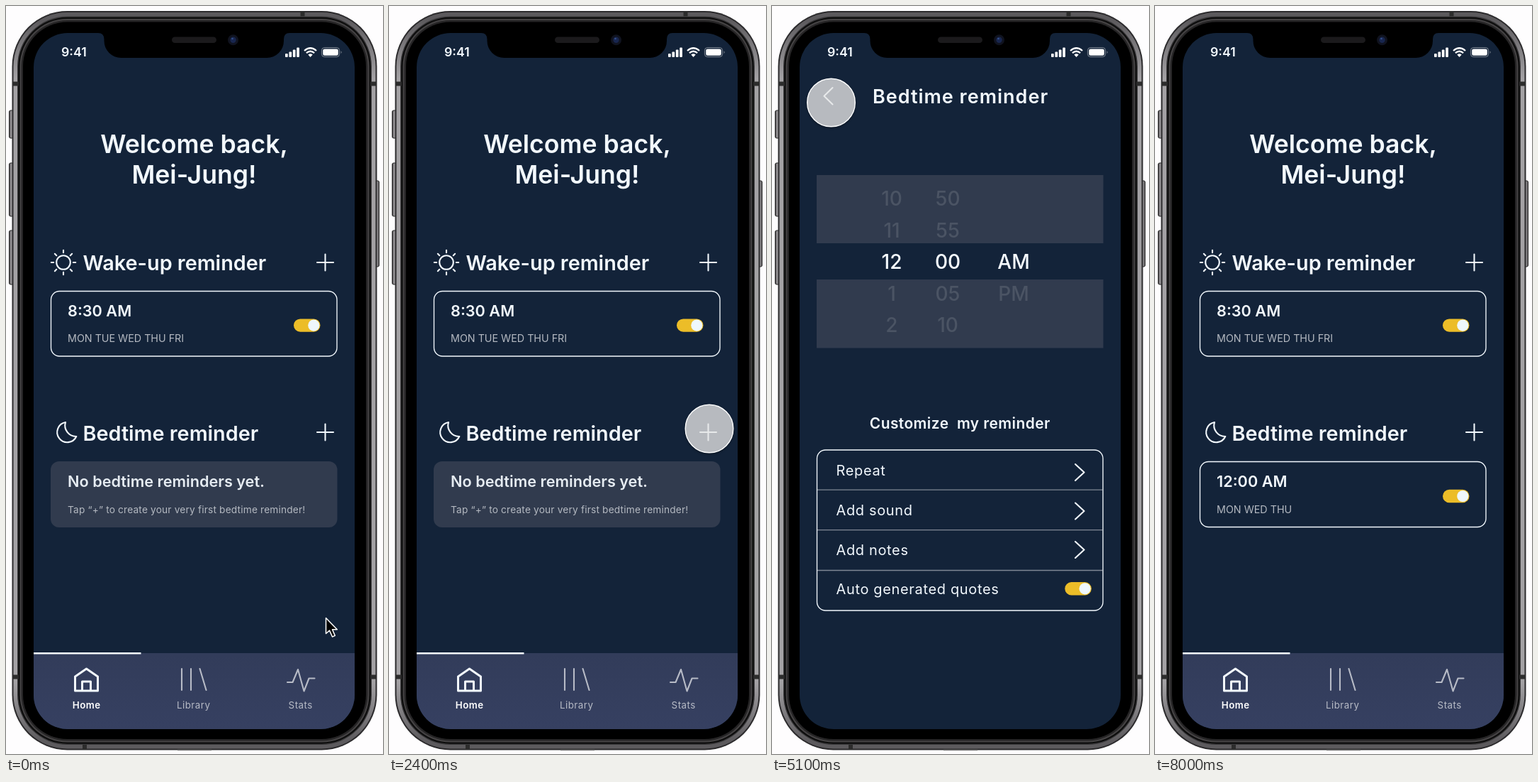
These frames come from a looping animation (532x1053 px, 8.1 s). An HTML page:

```html
<!DOCTYPE html>
<html lang="en">
<head>
<meta charset="utf-8">
<title>Bedtime reminder</title>
<style>
  html, body { margin: 0; width: 100%; height: 100%; overflow: hidden; background: #fefdfe; }
  svg { display: block; width: 532px; height: 1053px; }
  text { font-family: Inter, "Open Sans", sans-serif; fill: #f2f8fd; }
  .line { fill: none; stroke: #f2f8fd; stroke-width: 2.1; stroke-linecap: round; stroke-linejoin: round; }
  .thin { stroke-width: 1.35; }
  .bold { stroke-width: 3; }
  .off { stroke: #b7bbc6; }
  .mid { text-anchor: middle; }
  .welcome { font-size: 35.6px; font-weight: 600; }
  .head { font-size: 28.8px; font-weight: 600; }
  .title { font-size: 27px; font-weight: 600; letter-spacing: 1px; }
  .time { font-size: 21.7px; font-weight: 600; }
  .note { font-size: 14.3px; fill: #b4b9c1; }
  .tip { font-size: 13.7px; letter-spacing: .18px; fill: #b4b9c1; }
  .tab { font-size: 13.3px; letter-spacing: .5px; fill: #b7bbc6; }
  .tab.on { font-weight: 600; fill: #fff; }
  .sub { font-size: 20.9px; font-weight: 600; letter-spacing: .45px; }
  .row { font-size: 20px; letter-spacing: .65px; }
  .pick { font-size: 28px; font-weight: 500; text-anchor: middle; fill: #4b5464; }
  .pick.on { fill: #f6fbff; }
</style>
</head>
<body>
<svg viewBox="0 0 532 1053">
  <defs>
    <linearGradient id="nav" x1="0" y1="0" x2="0" y2="1">
      <stop offset="0" stop-color="#323c5a"/><stop offset="1" stop-color="#364061"/>
    </linearGradient>
    <linearGradient id="key">
      <stop offset="0" stop-color="#4a484a"/><stop offset=".5" stop-color="#a9a6a9"/><stop offset="1" stop-color="#5a585a"/>
    </linearGradient>
    <linearGradient id="rim" x1="0" y1="0" x2="0" y2="1">
      <stop offset=".01" stop-color="#5c5a5d"/><stop offset=".09" stop-color="#a3a1a4"/>
      <stop offset=".91" stop-color="#a3a1a4"/><stop offset=".99" stop-color="#5c5a5d"/>
    </linearGradient>
    <clipPath id="clip"><rect x="39" y="38" width="453" height="980" rx="48"/></clipPath>
    <filter id="soft" x="-20%" y="-20%" width="140%" height="140%" color-interpolation-filters="sRGB">
      <feDropShadow dx="0" dy="1.5" stdDeviation="1.5" flood-color="#000" flood-opacity=".4"/>
    </filter>
    <g id="plus"><path class="line" d="M-11.5 0H11.5M0 -11.5V11.5"/></g>
    <g id="more"><path class="line" d="M-6 -11.5L6.5 0L-6 11.5"/></g>
    <g id="toggle">
      <rect x="-18.5" y="-9.2" width="37.5" height="18.4" rx="9.2" fill="#ecbd28"/>
      <circle cx="9.8" r="8.1" fill="#eff7fc"/>
    </g>
  </defs>

  <!-- phone body -->
  <g fill="url(#key)" stroke="#222" stroke-width="1">
    <rect x="4.5" y="147" width="7" height="39" rx="2"/>
    <rect x="4.5" y="221" width="7" height="75" rx="2"/>
    <rect x="4.5" y="316" width="7" height="76" rx="2"/>
    <rect x="519" y="246" width="7.5" height="121" rx="2"/>
  </g>
  <g id="body"></g>
  <path d="M9 109.5h9M9 944.5h9M514 109.5h9M514 944.5h9M418.5 7.5v7M111 1040v7" stroke="#2c2c2c" stroke-width="6"/>
  <path d="M242 1047.5h48" stroke="#777" stroke-width="1.5"/>

  <g clip-path="url(#clip)">
    <rect x="39" y="38" width="453" height="980" fill="#132339"/>

    <g id="home">
      <text class="welcome mid" x="265.5" y="206.5">Welcome back,</text>
      <text class="welcome mid" x="265.5" y="249.5">Mei-Jung!</text>

      <g id="sun" transform="translate(81 361)"><circle class="line" r="9.8"/></g>
      <text class="head" x="108.5" y="371.5">Wake-up reminder</text>
      <use href="#plus" x="450.5" y="361"/>
      <rect class="line thin" x="63.5" y="401.5" width="403.5" height="91.5" rx="12"/>
      <text class="time" x="87" y="437">8:30 AM</text>
      <text class="note" x="87" y="473">MON TUE WED THU FRI</text>
      <use href="#toggle" x="424.5" y="449.6"/>

      <path class="line" d="M84 586A14.2 14.2 0 1 0 99.3 606A15.5 15.5 0 0 1 84 586Z"/>
      <text class="head" x="108.5" y="611.5">Bedtime reminder</text>
      <use href="#plus" x="450.5" y="600"/>
      <g id="empty">
        <rect x="63" y="641" width="404.5" height="93" rx="12" fill="#313b4e"/>
        <text class="time" x="87" y="677" opacity=".94">No bedtime reminders yet.</text>
        <text class="tip" x="87" y="713.5">Tap “+” to create your very first bedtime reminder!</text>
      </g>
      <g id="saved">
        <rect class="line thin" x="63.5" y="641.5" width="403.5" height="92" rx="12"/>
        <text class="time" x="87" y="677">12:00 AM</text>
        <text class="note" x="87" y="713.5">MON WED THU</text>
        <use href="#toggle" x="424.5" y="690"/>
      </g>

      <rect x="39" y="911" width="453" height="107" fill="url(#nav)"/>
      <path d="M39 911.3H190.5" stroke="#f2f8fd" stroke-width="2.6"/>
      <path class="line bold" d="M97.5 944L113.5 933L129.5 944V964H97.5ZM107.5 964V951H119.5V964"/>
      <path class="line off" d="M248 933V963M261 933V963M273.5 933L282.5 963"/>
      <path class="line off" d="M397 952H404.5L412 934L420.5 964.5L427.5 946.5H435.5"/>
      <text class="tab on mid" x="113.7" y="988.5">Home</text>
      <text class="tab mid" x="264.7" y="988.5">Library</text>
      <text class="tab mid" x="415.7" y="988.5">Stats</text>
    </g>

    <g id="edit">
      <path class="line" d="M85.5 115L73.5 126.8L85.5 138.5"/>
      <text class="title mid" x="266" y="137">Bedtime reminder</text>
      <path d="M63 238H467.5V334H63ZM63 385H467.5V481.5H63Z" fill="#313b4e"/>
      <g id="picker"></g>
      <text class="sub mid" x="265.3" y="595">Customize&#160; my reminder</text>
      <path d="M64 681.2H466.5M64 737.7H466.5M64 794.5H466.5" stroke="#7f8794" stroke-width="1.3"/>
      <rect class="line thin" x="63.5" y="625" width="403.5" height="226" rx="12"/>
      <text class="row" x="90.5" y="661">Repeat</text>
      <text class="row" x="90.5" y="716.8">Add sound</text>
      <text class="row" x="90.5" y="772.5">Add notes</text>
      <text class="row" x="90.5" y="828">Auto generated quotes</text>
      <use href="#more" x="434" y="656.5"/>
      <use href="#more" x="434" y="711"/>
      <use href="#more" x="434" y="765.5"/>
      <use href="#toggle" x="431.8" y="820.3"/>
    </g>

    <!-- status bar -->
    <text x="78" y="71" font-size="17.8" font-weight="600">9:41</text>
    <g fill="#fff">
      <rect x="394" y="67" width="3.7" height="5" rx="1"/>
      <rect x="399.4" y="64.5" width="3.7" height="7.5" rx="1"/>
      <rect x="404.8" y="61.5" width="3.7" height="10.5" rx="1"/>
      <rect x="410.2" y="58.5" width="3.7" height="13.5" rx="1"/>
      <path d="M429.5 72L426.3 68.6Q429.5 66 432.7 68.6Z"/>
      <rect x="447.2" y="60.4" width="21.6" height="9.4" rx="2.4"/>
      <path d="M472.6 63.2Q474.6 65 472.6 67Z" opacity=".5"/>
    </g>
    <path d="M421 63Q429.5 55.5 438 63M423.9 66.2Q429.5 61.3 435.1 66.2" fill="none" stroke="#fff" stroke-width="2.3"/>
    <rect x="445.4" y="58.6" width="25.2" height="13" rx="4" fill="none" stroke="#fff" stroke-opacity=".45"/>
  </g>

  <!-- notch -->
  <path d="M130 36V38Q138.5 38 138.5 47V49A24 24 0 0 0 162.5 73H368A24 24 0 0 0 392 49V47Q392 38 400 38V36Z" fill="#000"/>
  <rect x="234" y="43.5" width="63" height="8.5" rx="4.25" fill="#1b1a1c"/>
  <circle cx="320.5" cy="47.8" r="7.5" fill="#10131f"/>
  <circle cx="320.5" cy="47.8" r="4.2" fill="#18264f"/>
  <circle cx="319.5" cy="46" r="1.3" fill="#35508a"/>

  <path id="arrow" transform="translate(451.5 861.5)" d="M0 0V22L5 17.6L9 26.5L12.8 24.9L9 16.2H15.8Z"
        fill="#000" stroke="#fff" stroke-width="1.5" stroke-linejoin="round"/>
  <g id="touch" filter="url(#soft)">
    <circle r="33.8" fill="#fff" fill-opacity=".7" stroke="#fff" stroke-width="1.4"/>
  </g>
</svg>

<script>
  const LOOP = 8100, STEP = 100;
  const OPEN = 2600, PICK = 4200, BACK = 5900, TOUCH = 1300;
  const $ = id => document.getElementById(id);
  const show = (id, on) => $(id).setAttribute('display', on ? 'inline' : 'none');

  // nested rounded rectangles: inset, colour
  $('body').innerHTML = [
    [0, '#2b2a2c'], [2, 'url(#rim)'], [7.5, '#3a393b'], [8.8, '#0c0c0c'],
    [11, '#454344'], [13, '#262526'], [15.5, '#000']
  ].map(([d, c]) =>
    `<rect x="${8.5 + d}" y="${7 + d}" width="${515 - 2 * d}" height="${1040.5 - 2 * d}" rx="${78 - d}" fill="${c}"/>`
  ).join('');

  $('sun').innerHTML += Array.from({ length: 8 }, (_, i) =>
    `<path class="line" d="M0 -13.8V-17.2" transform="rotate(${i * 45})"/>`).join('');

  const column = (x, items) => items.map((s, i) =>
    `<text class="pick${i === 2 ? ' on' : ''}" x="${x}" y="${281 + i * 44.6}">${s}</text>`).join('');
  $('picker').innerHTML =
    `<g id="hours8">${column(167, [6, 7, 8, 9, 10])}</g>` +
    `<g id="hours12">${column(169, [10, 11, 12, 1, 2])}</g>` +
    column(248, ['50', '55', '00', '05', '10']) +
    column(341, ['', '', 'AM', 'PM', '']);

  // touch point: time, x, y, opacity
  const path = [
    [1200, 457, 870, 0], [1300, 456, 845, 1], [1450, 446, 715, 1], [1600, 434.5, 575, 1],
    [1800, 437, 574, 1], [2100, 452, 592, 1], [2400, 452, 595, 1], [3300, 452, 595, 1],
    [3400, 439, 571, 1], [3600, 372, 448, 1], [3700, 359.5, 425, 1], [3880, 359.5, 425, 1],
    [4180, 359.5, 425, 0], [4600, 359.5, 425, 0], [4700, 338, 400, 1], [4900, 185, 238, 1],
    [5100, 83.5, 136, 1], [5300, 79.5, 120.5, 1], [5600, 79.5, 120.5, 1], [5700, 80.3, 122.7, 1],
    [6880, 80.3, 122.7, 1], [7100, 80.3, 122.7, 0], [LOOP, 80.3, 122.7, 0]
  ];

  function at(t) {
    const i = path.findIndex(p => p[0] > t);
    if (i < 1) return path[0];
    const a = path[i - 1], b = path[i], k = (t - a[0]) / (b[0] - a[0]);
    return a.map((v, n) => v + (b[n] - v) * k);
  }

  function draw(ms) {
    const t = Math.floor(ms % LOOP / STEP) * STEP;
    const home = t < OPEN || t >= BACK;
    show('home', home);
    show('edit', !home);
    show('empty', t < OPEN);
    show('saved', t >= BACK);
    show('hours8', t < PICK);
    show('hours12', t >= PICK);
    show('arrow', t < TOUCH);
    const [, x, y, o] = at(t);
    $('touch').setAttribute('transform', `translate(${x} ${y})`);
    $('touch').setAttribute('opacity', o);
  }

  const start = performance.now();
  function tick() {
    draw(performance.now() - start);
    requestAnimationFrame(tick);
  }
  tick();
</script>
</body>
</html>
```
